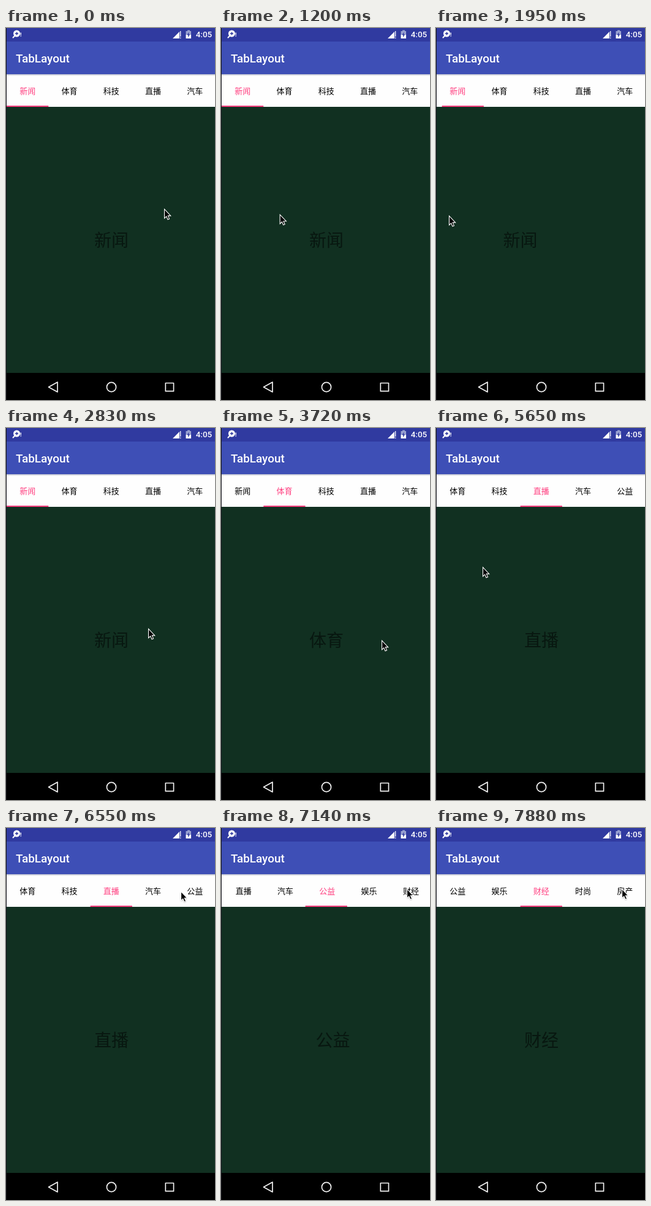
Recreate the animation shown at these times as an HTML page with a canvas. Size 341 by 604 pixels, loop 8000 ms.

```html
<!DOCTYPE html>
<html lang="zh">
<head>
<meta charset="utf-8">
<title>TabLayout</title>
<style>
html, body { margin: 0; width: 100%; height: 100%; overflow: hidden; background: #000; }
canvas { display: block; width: 341px; height: 604px; }
</style>
</head>
<body>
<canvas id="stage" width="341" height="604"></canvas>
<script>
const ctx = document.getElementById('stage').getContext('2d');
const LOOP = 8000, STEP = 148.6, LAST = 53;
const WIDTH = 341, PAGE = 340, TAB = 68.3;
const PINK = '#ff4081', STATUS = '#303aa0';
const CJK = '"Noto Sans CJK SC", "Noto Sans CJK", sans-serif';
const ROBOTO = 'Roboto, sans-serif';
const names = ['新闻', '体育', '科技', '直播', '汽车', '公益', '娱乐', '财经', '时尚', '房产'];

// All times below are counted in screen refreshes.
const SLIDE = 2.3;
const swipe = x => x ** 3 * (x * (6 * x - 15) + 10);
const tap = x => 1 - (1 - x) ** 5;
const smooth = x => x * x * (3 - 2 * x);

const slides = [
  { start: 12.43, to: 1, ease: swipe },
  { start: 16.6, to: 0, ease: swipe },
  { start: 20.3, to: 1, ease: swipe },
  { start: 26.3, to: 2, ease: swipe },
  { start: 35.3, to: 3, ease: swipe },
  { start: 46.7, to: 5, ease: tap },
  { start: 50, to: 7, ease: tap }
];

// Turning points of the hand: time, x, y.
const turns = [
  [2, 258, 293], [3, 283, 295], [11, 9, 305], [13, 21, 304], [19, 232, 325], [22, 60, 334],
  [25, 262, 344], [28, 76, 337], [35, 235, 332], [38, 76, 225], [44, 285, 102], [46, 303, 98]
];

function pagerAt(n) {
  let pos = 0, current = 0;
  for (const { start, to, ease } of slides) {
    if (n <= start) break;
    const k = ease(Math.min(1, (n - start) / SLIDE));
    if (ease === tap || k > .5) current = to;
    pos += (to - pos) * k;
  }
  return { pos, current };
}

function pointerAt(n) {
  const i = turns.findIndex(turn => turn[0] >= n);
  if (i <= 0) return turns.at(i).slice(1);
  const [t0, x0, y0] = turns[i - 1], [t1, x1, y1] = turns[i];
  const k = smooth((n - t0) / (t1 - t0));
  return [x0 + (x1 - x0) * k, y0 + (y1 - y0) * k];
}

// The tab strip runs slightly ahead of the page.
function lead(p) {
  const f = p % 1;
  return p + .28 * f * (1 - f);
}

function rect(color, x, y, w, h) {
  ctx.fillStyle = color;
  ctx.fillRect(x, y, w, h);
}

function text(str, x, y, font, color, align = 'left') {
  ctx.font = font;
  ctx.fillStyle = color;
  ctx.textAlign = align;
  ctx.fillText(str, x, y);
}

function poly(...pts) {
  ctx.beginPath();
  for (let i = 0; i < pts.length; i += 2) ctx.lineTo(pts[i], pts[i + 1]);
  ctx.closePath();
}

function circle(x, y, r) {
  ctx.beginPath();
  ctx.arc(x, y, r, 0, 2 * Math.PI);
}

function statusBar() {
  rect(STATUS, 0, 0, WIDTH, 22);
  ctx.strokeStyle = '#fff';
  ctx.lineWidth = 2;
  poly(15, 12, 11.5, 15.5);
  ctx.stroke();
  circle(17.5, 9, 5.5);
  ctx.fillStyle = '#fff';
  ctx.fill();
  rect(STATUS, 15, 8.2, 5, 1.6);
  rect(STATUS, 16.8, 6.5, 1.5, 5);
  rect('#fff', 23.6, 7.5, 1.3, 4);
  rect('#fff', 23.6, 12.3, 1.3, 1.4);

  poly(272, 17, 283, 6, 283, 17);
  ctx.fill();
  rect('#fff', 284, 5, 1.3, 9);
  rect('#fff', 284, 15.4, 1.3, 1.6);

  rect('#98a0d0', 296, 3.5, 4, 2);
  rect('#98a0d0', 293.5, 5, 8.5, 6);
  rect('#fff', 293.5, 11, 8.5, 6);
  ctx.fillStyle = STATUS;
  poly(298.5, 6.5, 295.3, 11.6, 297.3, 11.6, 296.8, 15.5, 300.2, 10.3, 298.2, 10.3);
  ctx.fill();
  text('4:05', 336, 15.3, '500 13.3px ' + ROBOTO, '#fff', 'right');
}

function appBar() {
  rect('#3e4fb6', 0, 22, WIDTH, 53);
  text('TabLayout', 16, 56, '500 18.9px ' + ROBOTO, '#fff');
}

function tabs(pos, current) {
  const q = lead(pos), scroll = Math.max(0, q - 2) * TAB;
  rect('#fefefe', 0, 75, WIDTH, 53);
  const shade = ctx.createLinearGradient(0, 75, 0, 78);
  shade.addColorStop(0, '#b9bccb');
  shade.addColorStop(1, '#fefefe');
  rect(shade, 0, 75, WIDTH, 3);
  names.forEach((name, i) => {
    const x = 1 + (i + .5) * TAB - scroll;
    text(name, x, 106.5, '500 13px ' + CJK, i === current ? PINK : '#000', 'center');
  });
  rect(PINK, 1 + q * TAB - scroll, 126, TAB, 2);
}

function pages(pos) {
  rect('#113021', 0, 128, WIDTH, 432);
  names.forEach((name, i) => {
    const x = 172 + (i - pos) * PAGE;
    text(name, x, 355.4, '28px ' + CJK, '#081710', 'center');
  });
}

function navBar() {
  rect('#000', 0, 560, WIDTH, 44);
  ctx.strokeStyle = '#f2f2f2';
  ctx.lineWidth = 1.7;
  ctx.lineJoin = 'round';
  poly(69.5, 583, 84, 575, 84, 591);
  ctx.stroke();
  circle(172, 583, 7.6);
  ctx.stroke();
  ctx.strokeRect(260.3, 576.5, 13.2, 13.2);
}

function cursor(x, y) {
  ctx.save();
  ctx.translate(x, y);
  ctx.lineJoin = 'miter';
  poly(.5, 1.2, .5, 16, 3.7, 12.9, 6, 18, 8.5, 16.9, 6.3, 11.9, 10.7, 11.9);
  ctx.shadowColor = 'rgba(0,0,0,.4)';
  ctx.shadowBlur = 2;
  ctx.shadowOffsetY = 1;
  ctx.fillStyle = '#000';
  ctx.fill();
  ctx.shadowColor = 'transparent';
  ctx.strokeStyle = '#fff';
  ctx.lineWidth = 1.1;
  ctx.stroke();
  ctx.restore();
}

function draw(now) {
  const n = Math.min(LAST, Math.floor(now % LOOP / STEP));
  const { pos, current } = pagerAt(n);
  pages(pos);
  tabs(pos, current);
  statusBar();
  appBar();
  navBar();
  rect('#101018', 0, 0, 1, 604);
  cursor(...pointerAt(n));
}

const start = performance.now();
function loop() {
  draw(performance.now() - start);
  requestAnimationFrame(loop);
}
loop();
</script>
</body>
</html>
```
